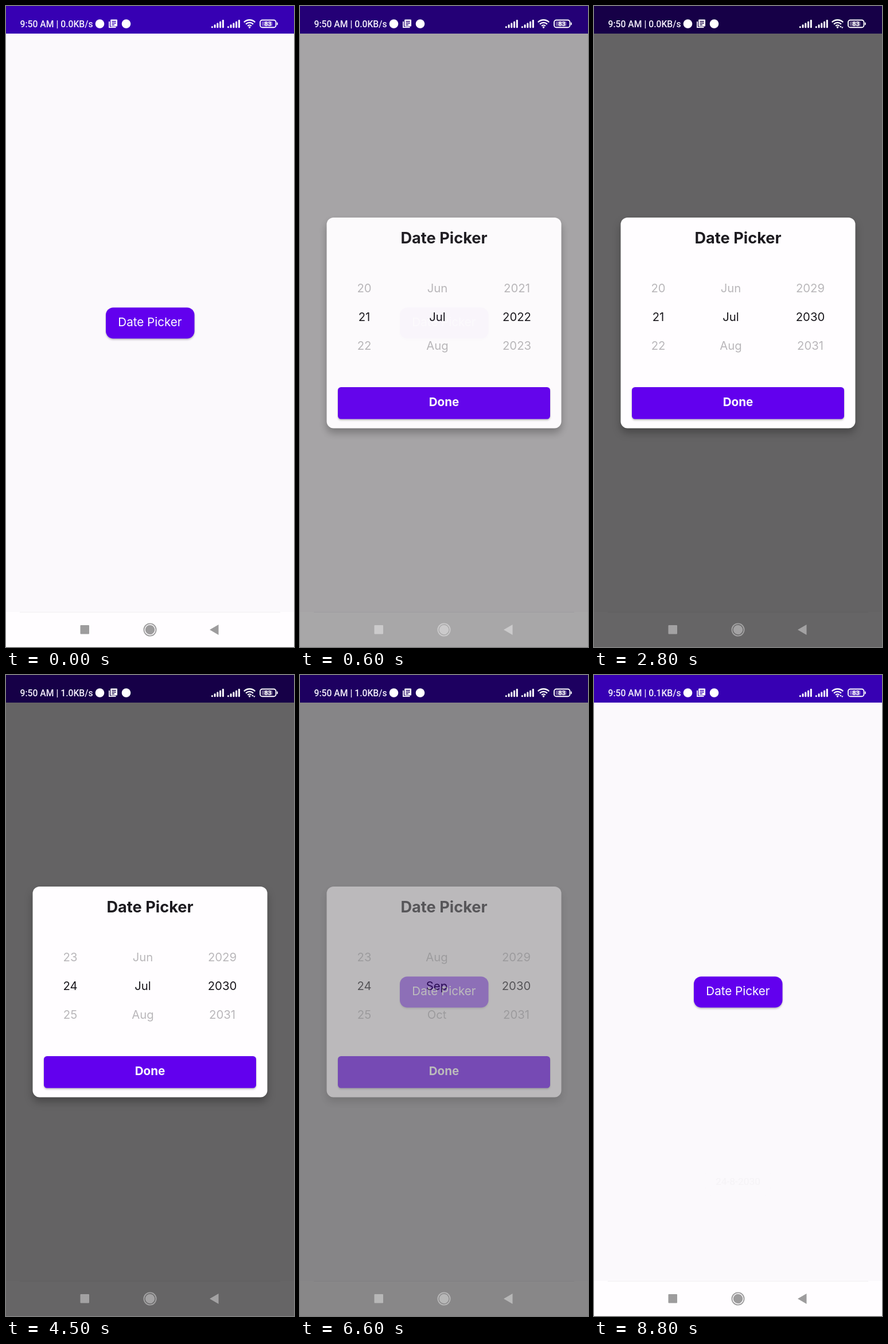
An HTML page that plays this animation: 502x1115 px, repeating every 9 s.

```html
<!DOCTYPE html>
<html lang="en">
<head>
<meta charset="utf-8">
<title>Date picker</title>
<style>
  html, body { margin: 0; width: 100%; height: 100%; overflow: hidden; background: #fbf9fc; }
  svg { display: block; width: 100%; height: 100%; }
  text { font-family: Inter, sans-serif; }
  .mid { text-anchor: middle; }
  .system { font-family: Roboto, sans-serif; }
  .raised { fill: #6200ee; filter: drop-shadow(0 2px 1.5px rgba(0, 0, 0, .25)); }
  .card { fill: #fffdff; filter: drop-shadow(0 8px 7px rgba(0, 0, 0, .28)); }
  .toast { fill: #fffeff; filter: drop-shadow(0 0 1px rgba(0, 0, 0, .12)) drop-shadow(0 16px 14px rgba(0, 0, 0, .13)); }
</style>
</head>
<body>
<svg viewBox="0 0 502 1115">
  <rect width="502" height="1115" fill="#fbf9fc"/>
  <rect width="502" height="48" fill="#3700b3"/>
  <rect y="1054" width="502" height="61" fill="#fffdff"/>
  <path d="M24 1054.5H478" stroke="#f0eef1"/>

  <rect class="raised" x="174" y="524.5" width="154.5" height="54" rx="13"/>
  <text class="mid" x="251" y="557" font-size="20.6" fill="#fff">Date Picker</text>

  <rect id="dim" width="502" height="1115"/>

  <g id="dialog">
    <rect class="card" x="46.5" y="368" width="409" height="366.5" rx="12"/>
    <text class="mid" x="251" y="412.5" font-size="27.2" font-weight="700" fill="#1d1b20">Date Picker</text>
    <clipPath id="window"><rect x="60" y="475" width="382" height="131"/></clipPath>
    <g id="wheels" clip-path="url(#window)" font-size="20.3"></g>
    <rect class="raised" x="66" y="663" width="370" height="55.5" rx="5.5"/>
    <text class="mid" x="251" y="696" font-size="20.6" font-weight="700" fill="#fff">Done</text>
  </g>

  <g id="toast">
    <rect class="toast" x="194.5" y="854.5" width="113" height="52.5" rx="16"/>
    <text class="mid system" x="251" y="887.3" font-size="17.4" fill="#111">24-8-2030</text>
  </g>

  <!-- status bar -->
  <g fill="#fff">
    <text id="clock" class="system" x="24.5" y="37" font-size="15.7" font-weight="500" fill="#f4f0fb"></text>
    <circle cx="163.5" cy="31" r="7.8"/>
    <path d="M180 27V37.2H191.5" fill="none" stroke="#fff" stroke-width="1.8"/>
    <path fill-rule="evenodd" d="M183.2 23.5H193a1 1 0 0 1 1 1V34.4a1 1 0 0 1 -1 1H183.2a1 1 0 0 1 -1 -1V24.500a1 1 0 0 1 1 -1zM184.500 26v1.600h7.200v-1.600zM184.500 29v1.600h7.200v-1.600zM184.500 32v1.400h4.500v-1.400z"/>
    <circle cx="209.5" cy="31" r="7.8"/>
    <g id="bars" stroke="#fff" stroke-width="3" stroke-linecap="round"></g>
    <g fill="none" stroke="#fff" stroke-width="2.3">
      <path d="M414.800 28.300A13.700 13.700 0 0 1 434.200 28.300"/>
      <path d="M418.100 31.600A9 9 0 0 1 430.900 31.600"/>
      <path d="M421.200 34.700A4.700 4.700 0 0 1 427.800 34.700"/>
    </g>
    <circle cx="424.5" cy="37" r="1.7"/>
    <path id="traffic" d="M428 37L430 34L432 37zM430.800 36.500L432.700 39L434.700 36.500z"/>
    <rect x="443" y="24.500" width="27.500" height="12.700" rx="3.800" fill="none" stroke="#fff" stroke-width="1.900"/>
    <rect x="445.500" y="27" width="19" height="7.700" rx="1.500" opacity=".35"/>
    <rect x="472" y="28.500" width="1.700" height="4.800" rx=".8"/>
    <text class="mid system" x="456.500" y="34.800" font-size="11" font-weight="700">83</text>
  </g>

  <!-- navigation bar -->
  <g id="nav">
    <rect x="129.500" y="1077" width="15.500" height="15.500" rx="1"/>
    <circle cx="251" cy="1085" r="8.300"/>
    <path fill-rule="evenodd" d="M239.500 1085a11.500 11.500 0 0 1 23 0a11.500 11.500 0 0 1 -23 0zM241.300 1085a9.700 9.700 0 0 0 19.400 0a9.700 9.700 0 0 0 -19.400 0z"/>
    <path d="M355 1085L370.500 1076V1094z"/>
  </g>
</svg>
<script>
const LOOP = 9000, STEP = 100, ROW = 49.7, BASE = 547.8;
const MONTHS = 'Jan Feb Mar Apr May Jun Jul Aug Sep Oct Nov Dec'.split(' ');
const $ = id => document.getElementById(id);

function add(parent, tag, attrs) {
  const el = document.createElementNS('http://www.w3.org/2000/svg', tag);
  for (const k in attrs) el.setAttribute(k, attrs[k]);
  return parent.appendChild(el);
}

for (const x of [359.3, 387.3])
  for (let i = 0; i < 5; i++)
    add($('bars'), 'path', { d: `M${x + i * 4.75} 36.7V${36.4 - i * 2.8}` });

// Linear interpolation through [time, value] stops
function track(t, stops) {
  const i = stops.findIndex(s => s[0] >= t);
  if (i < 0) return stops[stops.length - 1][1];
  if (i === 0) return stops[0][1];
  const [t0, a] = stops[i - 1], [t1, b] = stops[i];
  return a + (b - a) * (t - t0) / (t1 - t0);
}

const DIM = [[400, 0], [500, .1], [600, .343], [700, .6], [6500, .6], [6600, .466], [6700, .2], [6800, 0]];
const DIALOG = [[400, 0], [500, .45], [600, .97], [700, 1], [6500, 1], [6600, .44], [6700, .06], [6800, 0]];
const TOAST = [[6600, 0], [6700, .5], [6800, 1], [8500, 1], [8600, .7], [8700, .3], [8800, .02], [8900, .02], [9000, 0]];

const fling = (t, start, length) => {
  const u = Math.min(1, Math.max(0, (t - start) / length));
  return 1 - (1 - u) ** 2;
};

const wheels = [
  { x: () => 112, pos: t => 21 + 3 * fling(t, 3600, 700), label: n => n },
  { x: t => t < 2000 ? 239.5 : 238.5, pos: t => 6 + 2 * fling(t, 5500, 600), label: n => MONTHS[n % 12] },
  { x: t => t < 2000 ? 378 : 377, pos: t => 2022 + 8 * fling(t, 1800, 1000), label: n => n }
];
for (const w of wheels)
  w.rows = [-2, -1, 0, 1, 2].map(k =>
    add($('wheels'), 'text', { class: 'mid', fill: k ? '#b9b7ba' : '#18161b' }));

function draw(t) {
  const dim = track(t, DIM);
  $('dim').setAttribute('opacity', dim);
  $('dialog').setAttribute('opacity', track(t, DIALOG));
  $('toast').setAttribute('opacity', track(t, TOAST));

  const dark = dim > .15;
  $('nav').setAttribute('fill', dark ? '#fff' : '#000');
  $('nav').setAttribute('opacity', dark ? .4 : .38);

  const rate = t < 3900 ? '0.0' : t < 7700 ? '1.0' : '0.1';
  $('clock').textContent = `9:50 AM | ${rate}KB/s`;
  const busy = t >= 1700 && t < 4700 || t >= 7700;
  $('traffic').setAttribute('opacity', busy ? 1 : 0);

  for (const w of wheels) {
    const pos = w.pos(t), middle = Math.round(pos);
    w.rows.forEach((row, i) => {
      const n = middle + i - 2;
      row.textContent = w.label(n);
      row.setAttribute('x', w.x(t));
      row.setAttribute('y', BASE + (n - pos) * ROW);
    });
  }
}

const start = performance.now();
function frame() {
  const t = (performance.now() - start) % LOOP;
  draw(Math.floor(t / STEP) * STEP);
  requestAnimationFrame(frame);
}
frame();
</script>
</body>
</html>
```
